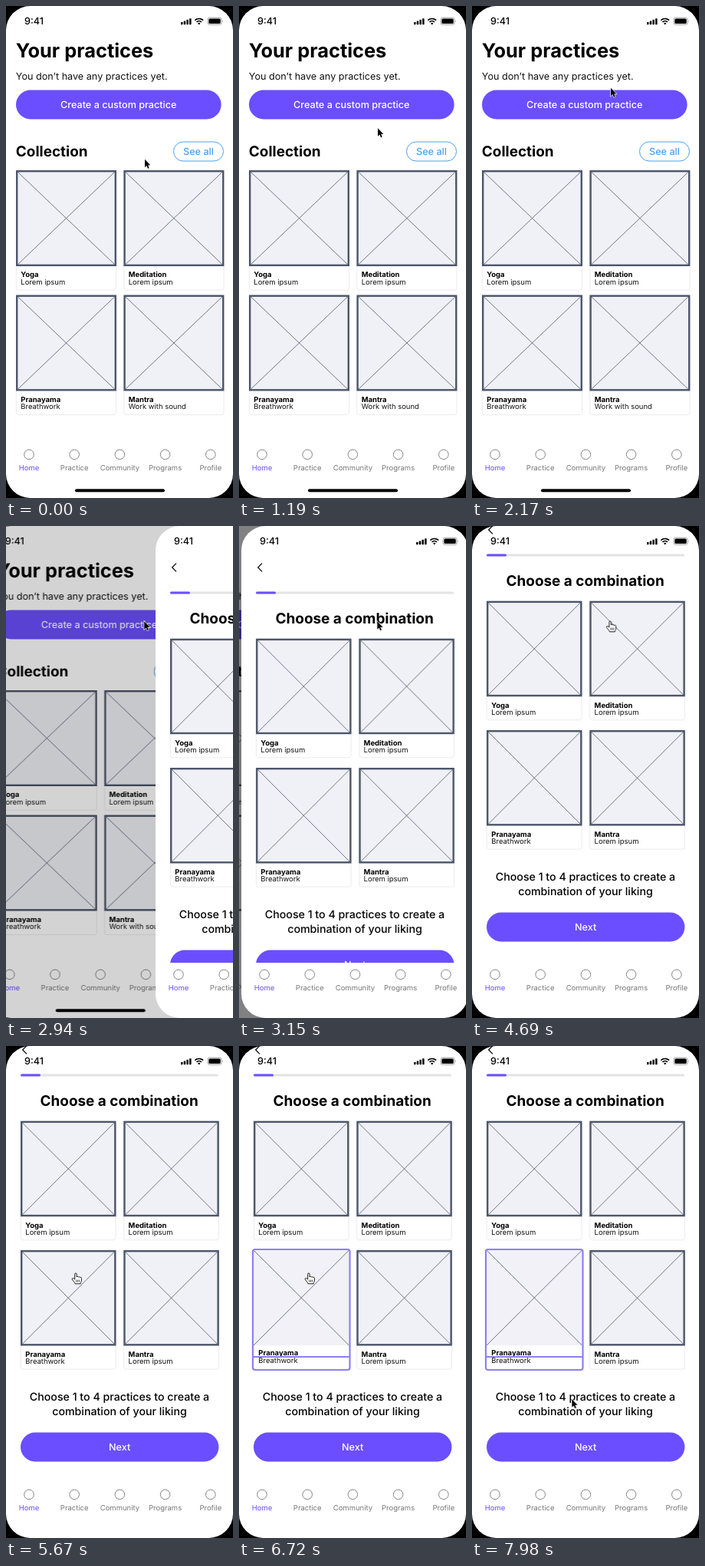
Write an HTML page that moves like this. It is 296 px wide and 641 px high and loops after 8000 ms.

```html
<!DOCTYPE html>
<html lang="en">
<head>
<meta charset="utf-8">
<title>Practice picker prototype</title>
<style>
html, body { margin: 0; width: 100%; height: 100%; overflow: hidden; background: #000; }
svg { display: block; width: 296px; height: 641px; font-family: Inter, "Liberation Sans", sans-serif; text-rendering: geometricPrecision; }
.anim { animation: 8s linear infinite; }
#home { animation-name: home; }
#dim { animation-name: dim; }
#choose { animation-name: choose; }
#scroll { animation-name: scroll; }
#plain { animation-name: plain; }
#picked { animation-name: picked; }
#cursor { animation-name: move; }
#arrow { animation-name: arrow; }
#hand { animation-name: hand; }

@keyframes home {
  0% { transform: translateX(0); visibility: visible; }
  35.925% { transform: translateX(0); animation-timing-function: ease-out; }
  39.675% { transform: translateX(-74px); visibility: visible; }
  39.68%, 100% { transform: translateX(-74px); visibility: hidden; }
}
@keyframes dim {
  0% { opacity: 0; }
  35.925% { opacity: 0; animation-timing-function: ease-out; }
  39.675%, 100% { opacity: .5; }
}
@keyframes choose {
  0% { transform: translateX(296px); }
  35.925% { transform: translateX(296px); animation-timing-function: ease-out; }
  39.675%, 100% { transform: translateX(0); }
}
@keyframes scroll {
  0% { transform: translateY(49px); }
  49.375% { transform: translateY(49px); animation-timing-function: ease-in-out; }
  57.5%, 100% { transform: translateY(0); }
}
@keyframes plain {
  0%, 83.93% { opacity: 1; }
  83.94%, 100% { opacity: 0; }
}
@keyframes picked {
  0%, 83.93% { opacity: 0; }
  83.94%, 100% { opacity: 1; }
}
@keyframes move {
  0% { transform: translate(181px, 199.5px); }
  10.5% { transform: translate(181px, 199.5px); animation-timing-function: ease-in-out; }
  20.125% { transform: translate(181px, 104px); }
  27.125% { transform: translate(181px, 106.5px); animation-timing-function: ease-in-out; }
  30.6%, 61.25% { transform: translate(180.3px, 124px); animation-timing-function: ease-in-out; }
  71%, 87.5% { transform: translate(91px, 296px); animation-timing-function: ease-in-out; }
  97.5%, 100% { transform: translate(130.3px, 460px); }
}
@keyframes arrow {
  0%, 28.1% { opacity: 1; }
  28.11%, 35.92% { opacity: 0; }
  35.93%, 53.4% { opacity: 1; }
  53.41%, 93.7% { opacity: 0; }
  93.71%, 100% { opacity: 1; }
}
@keyframes hand {
  0%, 28.1% { opacity: 0; }
  28.11%, 35.92% { opacity: 1; }
  35.93%, 53.4% { opacity: 0; }
  53.41%, 93.7% { opacity: 1; }
  93.71%, 100% { opacity: 0; }
}
</style>
</head>
<body>
<svg id="stage" viewBox="0 0 296 641"></svg>
<script>
const purple = '#6b4eff', slate = '#4d566a', blue = '#48a2f2';

const text = (s, x, y, size, weight = 400, fill = '#000', anchor = 'start') =>
  `<text x="${x}" y="${y}" font-size="${size}" font-weight="${weight}" fill="${fill}" text-anchor="${anchor}">${s}</text>`;

const box = (x, y, w, h, r, fill, stroke = 'none', sw = 1) =>
  `<rect x="${x}" y="${y}" width="${w}" height="${h}" rx="${r}" fill="${fill}" stroke="${stroke}" stroke-width="${sw}"/>`;

const cross = (x, y, w, h) =>
  `<path d="M${x} ${y}l${w} ${h}m0 ${-h}l${-w} ${h}" fill="none" stroke="${slate}" stroke-width=".8"/>`;

const labels = (x, y, title, sub) =>
  text(title, x, y, 9.47, 700) + text(sub, x, y + 9.6, 9.47, 400, '#111');

// Wireframe card: bordered placeholder picture, title and subtitle.
const card = (x, y, w, ih, h, title, sub) =>
  box(x + .4, y + .4, w - .8, h - .8, 3, '#fff', '#e6e6ea', .8) +
  box(x + 1.2, y + 1.2, w - 2.4, ih - 2.4, 0, '#f0f1f6', slate, 2.4) +
  cross(x + 1, y + 1, w - 2, ih - 2) +
  labels(x + 6.3, y + ih + 14.3, title, sub);

const pickedCard = (x, y, title, sub) =>
  box(x, y, 124.5, 156, 3, '#fff') +
  box(x, y, 124.5, 124, 0, '#f1f1f7') +
  cross(x, y, 124.5, 124) +
  labels(x + 6.3, y + 137, title, sub) +
  `<path d="M${x - 1} ${y + 139}h126.5" stroke="#8f7ff6" stroke-width="2"/>` +
  box(x - 1, y - 1, 126.5, 157, 3, 'none', '#8f7ff6', 2.2);

const bars = [0, 1, 2, 3].map(i =>
  box(228 + i * 3.7, 21 - i * 1.6, 2.5, 3.2 + i * 1.6, .6, '#000')).join('');

const status = text('9:41', 24, 24, 12.6, 500) + bars +
  `<g fill="none" stroke="#000" stroke-width="1.7">
     <path d="M246.3 18.7a7.7 7.7 0 0 1 10.8 0M248.5 21a4.6 4.6 0 0 1 6.4 0"/>
   </g>
   <path d="M251.7 24.4l-1.7-1.9a2.6 2.6 0 0 1 3.4 0z"/>` +
  box(263, 15.2, 18, 9.2, 2.6, 'none', '#888', .8) +
  box(264.3, 16.5, 15.4, 6.6, 1.5, '#000') +
  `<path d="M282.1 18.2q1.3 1.6 0 3.2z" fill="#888"/>`;

const nav = box(0, 569, 296, 72, 0, '#fff') +
  ['Home', 'Practice', 'Community', 'Programs', 'Profile'].map((s, i) => {
    const x = 30 + i * 59.2;
    return `<circle cx="${x}" cy="584.3" r="6.3" fill="#fff" stroke="#858585"/>` +
      text(s, x, 605, 9.47, 400, i ? '#777' : purple, 'middle');
  }).join('');

const button = (x, y, w, s) =>
  box(x, y, w, 37.8, 18.9, purple) + text(s, x + w / 2, y + 23.4, 12.63, 500, '#fff', 'middle');

const home = box(0, 0, 296, 641, 0, '#fff') + status +
  text('Your practices', 12.7, 67.2, 25.4, 700) +
  text('You don’t have any practices yet.', 12.8, 95.6, 12.63, 400, '#111') +
  button(13, 109.6, 267.6, 'Create a custom practice') +
  text('Collection', 12.8, 196.3, 18.94, 700) +
  box(218.5, 177, 65, 25, 12.5, '#fff', blue) +
  text('See all', 251, 193.9, 12.63, 500, blue, 'middle') +
  card(13, 214, 131, 125, 156.5, 'Yoga', 'Lorem ipsum') +
  card(153.4, 214, 131, 125, 156.5, 'Meditation', 'Lorem ipsum') +
  card(13, 376.5, 131, 125, 156.5, 'Pranayama', 'Breathwork') +
  card(153.4, 376.5, 131, 125, 156.5, 'Mantra', 'Work with sound') +
  nav + box(90, 629.3, 117, 4, 2, '#000');

const small = (x, y, title, sub) => card(x, y, 124.5, 124.5, 155.5, title, sub);

const list =
  `<path d="M27 -.3l-5.3 5.3 5.3 5.3" fill="none" stroke="#000" stroke-width="1.2"/>` +
  box(19, 36.4, 258, 3.2, 1.6, '#e3e3e5') + box(19, 36.4, 26, 3.2, 1.6, purple) +
  text('Choose a combination', 147.6, 78, 18.94, 700, '#000', 'middle') +
  small(19, 97.7, 'Yoga', 'Lorem ipsum') +
  small(153.3, 97.7, 'Meditation', 'Lorem ipsum') +
  `<g id="plain" class="anim">${small(19, 266, 'Pranayama', 'Breathwork')}</g>
   <g id="picked" class="anim">${pickedCard(19, 266, 'Pranayama', 'Breathwork')}</g>` +
  small(153.3, 266, 'Mantra', 'Lorem ipsum') +
  text('Choose 1 to 4 practices to create a', 148, 462, 14.2, 500, '#000', 'middle') +
  text('combination of your liking', 148, 481, 14.2, 500, '#000', 'middle') +
  button(19, 503.6, 258.4, 'Next');

const cursor =
  `<path id="arrow" class="anim" d="M0 .3V10.8L2.4 8.5 4 12.2 5.7 11.5 4.1 7.8H7.3Z" stroke="#fff" stroke-width="1.2" paint-order="stroke"/>
   <g id="hand" class="anim" stroke="#000" stroke-width=".9" stroke-linejoin="round">
     <path fill="#fff" d="M-1.3 8V1.2a1.2 1.2 0 0 1 2.4 0V5c.3-1 2.2-.9 2.4.2.4-.8 2-.6 2.2.4.6-.6 1.7-.3 1.7.8V9c0 2.4-1.3 2.8-1.3 4.8H-.8C-1 12-4.4 9.5-4.8 7.6-5 6.4-3.4 6-2.6 7Z"/>
     <path fill="none" stroke-width=".7" d="M.6 8.6v3M2.5 8.6v3M4.4 8.6v3"/>
   </g>`;

document.getElementById('stage').innerHTML =
  `<clipPath id="phone"><rect width="296" height="641" rx="31.6"/></clipPath>
   <g id="home" class="anim"><g clip-path="url(#phone)">${home}
     <rect id="dim" class="anim" width="296" height="641"/></g></g>
   <g id="choose" class="anim"><g clip-path="url(#phone)">${box(0, 0, 296, 641, 0, '#fff')}
     <g id="scroll" class="anim">${list}</g>${status}${nav}</g></g>
   <g id="cursor" class="anim">${cursor}</g>`;
</script>
</body>
</html>
```
